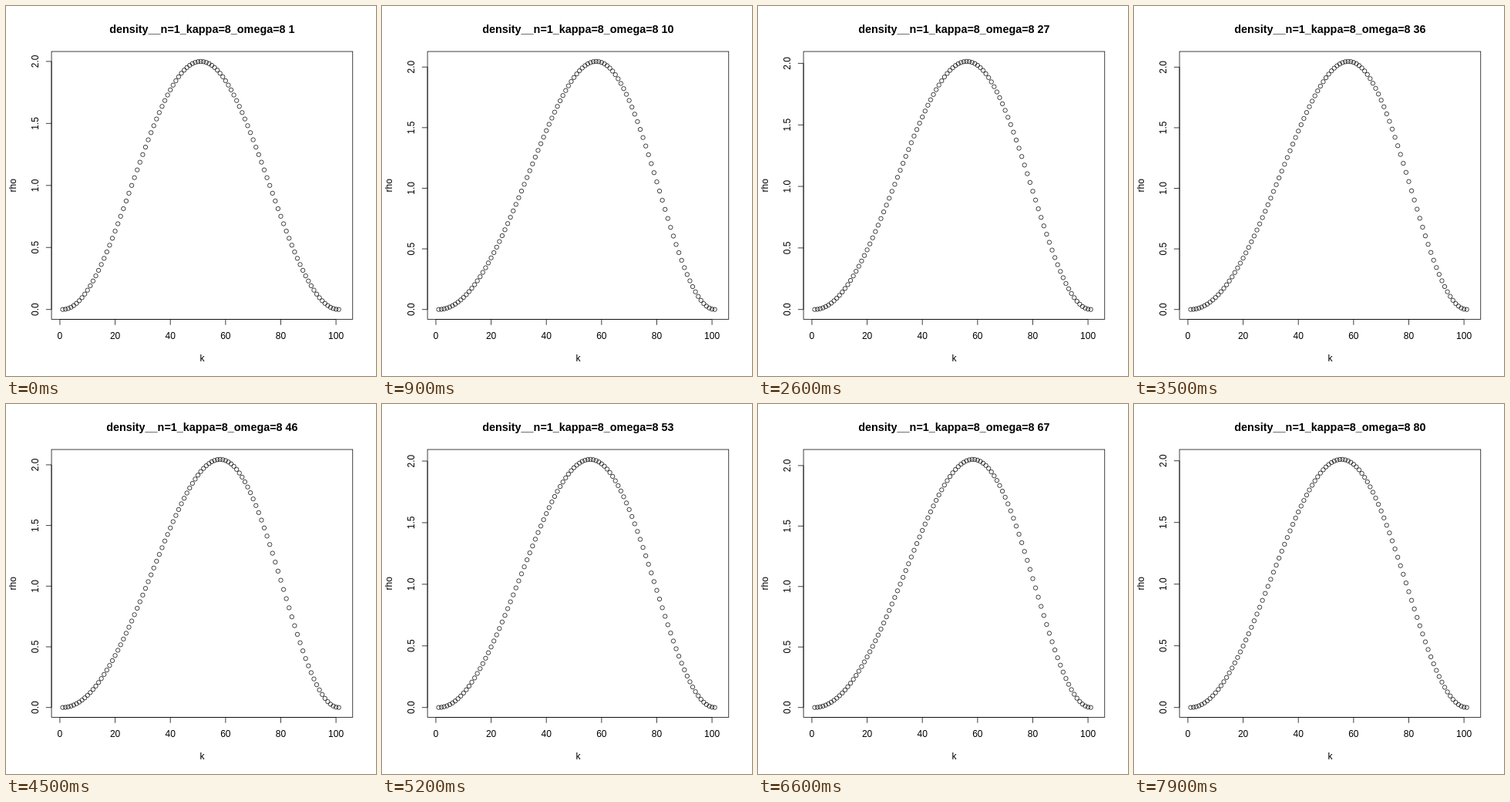
These frames come from a looping animation (480 by 480 pixels, 8 s). An HTML page with a canvas:

```html
<!DOCTYPE html>
<html lang="en">
<head>
<meta charset="utf-8">
<title>density</title>
<style>
  html, body { margin: 0; width: 100%; height: 100%; overflow: hidden; background: #fff; }
  canvas { display: block; }
</style>
</head>
<body>
<canvas id="plot" width="480" height="480"></canvas>
<script>
const g = document.getElementById('plot').getContext('2d');
const FONT = '"Liberation Sans", Arial, sans-serif';
const LEFT = 59.04, RIGHT = 449.76, TOP = 59.04, BOTTOM = 406.56, TICK = 7.2;
const PAD = 0.04 / 1.08;
const ZERO = BOTTOM - (BOTTOM - TOP) * PAD;
const HEIGHT = (BOTTOM - TOP) / 1.08;
const STEP_X = (RIGHT - LEFT) / 1.08 / 101;
const toX = k => LEFT + (RIGHT - LEFT) * PAD + (k - 1) * STEP_X;

// Field switched on exponentially: first excited state's amplitude at step s,
// with a weak beat against the next level.
const SHIFT = 0.0915, FREQ = 1.2139, RATE = FREQ / 3.76;
const BEAT = 0.004, BEAT_FREQ = 1.99;
function amplitude(s) {
  const norm = FREQ * FREQ + RATE * RATE, fade = Math.exp(-RATE * s);
  const kr = -SHIFT * FREQ * FREQ / norm, ki = SHIFT * FREQ * RATE / norm;
  const c = Math.cos(FREQ * s), d = Math.sin(FREQ * s);
  const beat = BEAT * (1 - fade) * Math.cos(BEAT_FREQ * s + 0.8);
  return {
    re: SHIFT + kr * fade - ((SHIFT + kr) * c + ki * d) + beat,
    im: ki * fade - (ki * c - (SHIFT + kr) * d)
  };
}

// Density of the lowest three box states on 101 grid points.
function density(s) {
  const { re, im } = amplitude(s), third = 0.07 * re;
  const norm = 1 + re * re + im * im + third * third;
  return Array.from({ length: 101 }, (_, i) => {
    const a = Math.PI * i / 100, s2 = Math.sin(2 * a);
    const real = Math.sin(a) - re * s2 + third * Math.sin(3 * a);
    return 2 * (real * real + im * im * s2 * s2) / norm;
  });
}

function text(str, x, y, turned, font = '12px ') {
  g.save();
  g.translate(x, y);
  if (turned) g.rotate(-Math.PI / 2);
  g.font = font + FONT;
  g.fillText(str, 0, 0);
  g.restore();
}

function line(x1, y1, x2, y2) {
  g.beginPath();
  g.moveTo(x1, y1);
  g.lineTo(x2, y2);
  g.stroke();
}

function draw(step) {
  const rho = density(step);
  const scale = HEIGHT / Math.max(...rho);
  const toY = v => ZERO - v * scale;
  g.fillStyle = '#fff';
  g.fillRect(0, 0, 480, 480);
  g.fillStyle = g.strokeStyle = '#000';
  g.lineWidth = 0.75;
  g.textAlign = 'center';

  rho.forEach((v, i) => {
    g.beginPath();
    g.arc(toX(i + 1), toY(v), 2.7, 0, 2 * Math.PI);
    g.stroke();
  });

  line(toX(0), BOTTOM, toX(100), BOTTOM);
  for (let k = 0; k <= 100; k += 20) {
    line(toX(k), BOTTOM, toX(k), BOTTOM + TICK);
    text(k, toX(k), 432.48);
  }
  line(LEFT, toY(0), LEFT, toY(2));
  for (let v = 0; v <= 2; v += 0.5) {
    line(LEFT - TICK, toY(v), LEFT, toY(v));
    text(v.toFixed(1), 41.76, toY(v), true);
  }
  g.strokeRect(LEFT, TOP, RIGHT - LEFT, BOTTOM - TOP);

  text('k', 254.4, 461.28);
  text('rho', 12.96, 232.8, true);
  text('density__n=1_kappa=8_omega=8 ' + (step + 1), 254.4, 35, false, 'bold 14.4px ');
}

let shown = -1;
function tick() {
  const step = Math.floor(performance.now() % 8000 / 100);
  if (step !== shown) draw(shown = step);
  requestAnimationFrame(tick);
}
tick();
</script>
</body>
</html>
```
